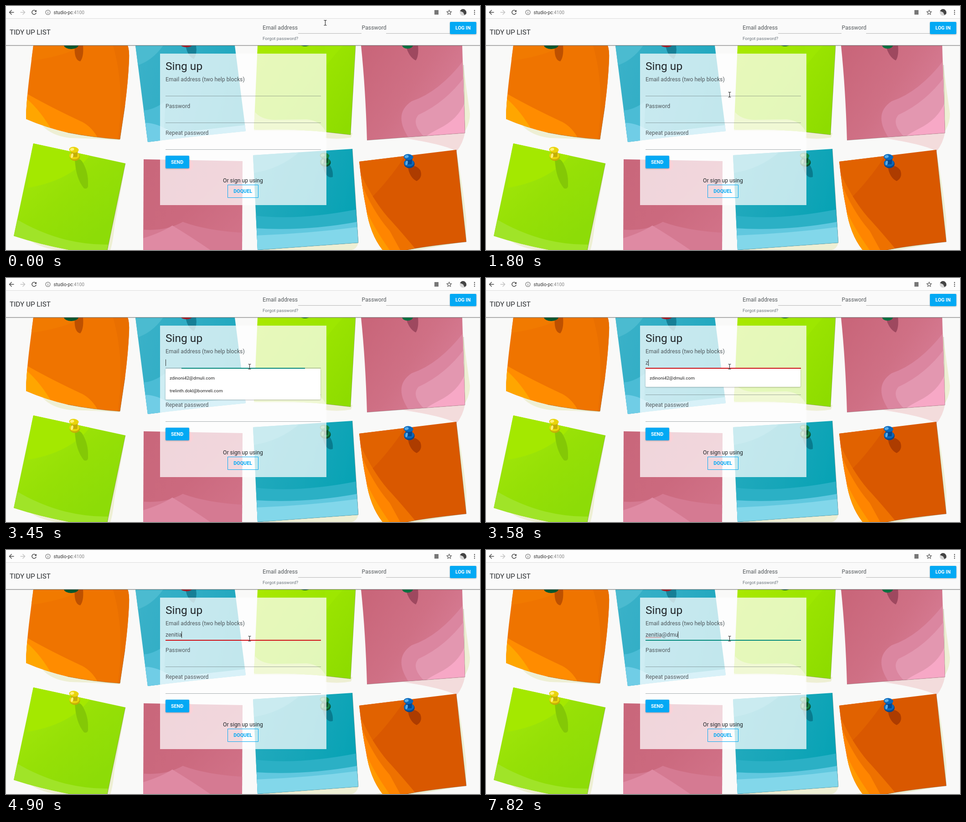
Recreate the animation shown at these times as an HTML page with a canvas. Size 1040 by 538 pixels, loop 8 s.

```html
<!DOCTYPE html>
<html lang="en">
<head>
<meta charset="utf-8">
<title>Sign-up form</title>
<style>
html, body { margin: 0; width: 100%; height: 100%; overflow: hidden; background: #f9f9f8; }
canvas { display: block; }
</style>
</head>
<body>
<canvas id="stage" width="1040" height="538"></canvas>
<script>
const W = 1040, H = 538, LOOP = 8000;
const FONT = 'Roboto, "Open Sans", sans-serif';
const view = document.getElementById('stage').getContext('2d');
const still = document.createElement('canvas');
still.width = W;
still.height = H;
let g = still.getContext('2d');

function shape(d, fill) {
  g.fillStyle = fill;
  g.fill(new Path2D(d));
}
function line(d, color, width = 1) {
  g.strokeStyle = color;
  g.lineWidth = width;
  g.stroke(new Path2D(d));
}
function rect(x, y, w, h, color) {
  g.fillStyle = color;
  g.fillRect(x, y, w, h);
}
function oval(x, y, rx, ry, color, turn = 0) {
  g.fillStyle = color;
  g.beginPath();
  g.ellipse(x, y, rx, ry, turn, 0, Math.PI * 2);
  g.fill();
}
function text(s, x, y, size, color, weight = 400) {
  g.font = `${weight} ${size}px ${FONT}`;
  g.fillStyle = color;
  g.fillText(s, x, y);
}
function fade(x0, y0, x1, y1, ...colors) {
  const f = g.createLinearGradient(x0, y0, x1, y1);
  colors.forEach((c, i) => f.addColorStop(i / (colors.length - 1), c));
  return f;
}
function raised(x, y, w, h, color) {
  g.save();
  g.shadowColor = 'rgba(0,0,0,.28)';
  g.shadowBlur = 3;
  g.shadowOffsetY = 1;
  g.fillStyle = color;
  g.beginPath();
  g.roundRect(x, y, w, h, 2);
  g.fill();
  g.restore();
}

// A paper outline with tinted areas clipped to it
function note(outline, fill, tints, edge) {
  shape(outline, fill);
  g.save();
  g.clip(new Path2D(outline));
  for (const [d, color] of tints) shape(d, color);
  g.restore();
  if (edge) line(edge, 'rgba(70,70,60,.3)');
}
function pin(x, y, dark, mid, light) {
  oval(x + 2, y + 7, 11.5, 9.5, dark);
  oval(x + 1, y + 5, 11, 8, mid);
  shape(`M${x - 7} ${y - 7}L${x - 5} ${y + 8}L${x + 7} ${y + 8}L${x + 9} ${y - 7}Z`, dark);
  oval(x, y - 8, 10.5, 6.5, mid, 0.1);
  oval(x - 4, y - 9, 4.5, 3, light, -0.2);
  oval(x - 4, y + 5, 2.5, 5, light, 0.2);
}

function notes() {
  const cream = '#eeefd4';

  shape('M80 264L252 290L249 296Q190 292 140 291Q100 286 80 264Z', cream);
  note('M60 87H267Q271 97 270 120Q268 165 261 220L250 294Q190 290 135 279Q85 267 44 249Q44 215 52 150Z', '#ef7400', [
    ['M48 87H165Q135 110 48 122Z', '#f17a00'],
    ['M235 87H280V294H245Q262 185 235 87Z', '#e96f00'],
    ['M40 190Q95 222 168 256Q190 268 203 294H40Z', '#ff8c00'],
    ['M40 200Q75 228 104 280L40 270Z', '#ffa600'],
    ['M150 87H169Q171 112 163 122Q153 120 151 104Z', '#bd5000']
  ], 'M261 220L250 294Q190 290 135 279');

  note('M284 87H502L526 276Q415 287 311 300Z', fade(290, 150, 520, 200, '#39b1c8', '#2eacc4', '#1da7bd'), [
    ['M280 87H345Q320 122 285 132Z', '#4bbbd0'],
    ['M296 230Q320 232 350 210L345 305H296Z', '#4bbcd5'],
    ['M300 258Q330 255 365 280L530 262V305H300Z', '#70cde6'],
    ['M394 87H417Q420 106 412 117Q398 110 394 87Z', '#167f96']
  ]);

  shape('M544 250L760 280L757 290Q730 295 700 291L703 276L544 275Z', cream);
  note('M552 87H767L756 284L703 278Q630 270 551 273L544 272Z', fade(545, 100, 765, 240, '#a9e800', '#9ce500', '#8edc00'), [
    ['M700 87H740Q716 112 700 135Z', '#9de700'],
    ['M540 225Q555 253 595 251L660 250Q690 252 703 280H540Z', '#c9e760']
  ], 'M767 88L756 284L703 278');

  shape('M1000 105L1010 180L1018 238Q1017 275 985 300L1003 278Z', cream);
  shape('M870 291L1007 279Q1003 302 989 320Q957 304 870 291Z', '#f3dcdc');
  note('M779 87H1001Q1004 190 1007 280L792 296Q789 185 779 87Z', fade(785, 115, 990, 250, '#c9667a', '#cf7085', '#d98099'), [
    ['M1004 120Q950 190 890 210Q845 240 890 300H1010Z', '#db86a0'],
    ['M1006 156Q965 212 905 240Q885 262 930 300H1010Z', '#e397b0'],
    ['M1007 212Q992 250 949 271Q929 281 913 293L1010 285Z', '#f7a8c6'],
    ['M877 87H904Q906 111 899 120Q884 113 877 87Z', '#9e485f']
  ], 'M1004 130L1007 280L792 296');

  shape('M259 365Q248 430 238 486Q235 520 229 538H205L222 430Z', cream);
  shape('M50 515L150 524V538H110Q72 532 50 515Z', cream);
  note('M60 303L262 347L222 540H150Q78 527 17 507Z', fade(60, 330, 205, 500, '#a2e70a', '#96e006', '#8ddc07'), [
    ['M58 300L185 328Q142 385 47 401Z', '#a4e800'],
    ['M23 470Q73 500 130 515Q180 527 224 526V540H10V500Z', '#a0e428'],
    ['M151 338Q163 334 169 346Q181 367 180 394Q181 405 171 402Q153 380 151 338Z', '#84c806']
  ], 'M262 347L222 540');
  pin(149, 325, '#c4ae07', '#e9d40b', '#fff27a');

  note('M302 338L519 342L518 538H301Z', fade(310, 350, 490, 538, '#c9677b', '#cb697e', '#d27389'), [
    ['M301 493Q350 497 388 476Q439 495 519 500V540H301Z', '#d57a92'],
    ['M301 512Q340 500 365 484Q411 512 451 540H301Z', '#df8aa3']
  ]);
  oval(399, 351, 11, 13, '#ee5a72');

  shape('M552 538L773 522Q770 535 759 538Z', cream);
  note('M542 329L760 315Q766 415 773 522L552 538Z', fade(555, 350, 760, 430, '#23aabe', '#17a6b9', '#08a3b5'), [
    ['M540 325L646 320Q602 359 544 368Z', '#3bb6c8'],
    ['M545 462Q640 474 772 448V540H545Z', '#2bb0c5'],
    ['M547 490Q659 497 775 475V540H547Z', '#61c8df'],
    ['M549 506Q661 502 775 487V540H549Z', '#82d7ea'],
    ['M698 338Q719 353 717 377Q703 382 695 355Z', '#087b8e']
  ], 'M760 315Q766 415 773 522L552 538');
  pin(699, 338, '#07502c', '#138343', '#66b47d');

  shape('M990 330Q1003 403 1010 470L1010 519L905 538H811Q880 525 975 510Z', cream);
  note('M775 343L988 317L1010 520Q915 530 870 540H828Q799 505 790 445Q781 400 775 343Z', '#d95800', [
    ['M770 338L878 327Q835 392 792 432Z', '#e16200'],
    ['M776 365Q805 428 838 466Q863 493 902 540H814L780 450Z', '#ee7100'],
    ['M778 386Q803 451 842 496L866 540H810Z', '#ff8500'],
    ['M785 439Q806 488 843 540H804Z', '#ff9a00'],
    ['M882 356Q898 347 909 362Q915 378 901 386Q886 379 882 356Z', '#ad3c00']
  ], 'M988 317L1010 520Q915 530 870 540');
  pin(883, 341, '#07478d', '#0869bd', '#5baee8');

  // Pins half covered by the header
  for (const [x, rx, ry, c] of [[143, 16, 9, '#0b572e'], [396, 12, 5, '#a91a26'], [656, 9, 3, '#0c6831'], [881, 12, 8, '#0b7041']]) {
    oval(x, 86, rx, ry, c);
  }
}

function browserBar() {
  rect(0, 0, W, 28, '#fdfdfd');
  rect(0, 27, W, 1, '#dcdcdc');
  line('M17.5 14H8M12.5 9L7.5 14L12.5 19', '#4b4b4b', 1.5);
  line('M31.5 14H41M36.5 9L41.5 14L36.5 19', '#c4c4c4', 1.5);
  line('M65.3 11A4.7 4.7 0 1 0 66.2 15', '#4b4b4b', 1.5);
  shape('M67 8.5V13H62.5Z', '#4b4b4b');
  line('M97 14A5 5 0 1 0 87 14A5 5 0 1 0 97 14M92 13V17M92 10.7V12', '#666', 1.1);
  const host = 'studio-pc';
  text(host, 104.5, 17.5, 10.2, '#333');
  text(':4100', 104.5 + g.measureText(host).width, 17.5, 10.2, '#858585');
  rect(940, 9, 9, 10, '#777');
  g.beginPath();
  for (let i = 0; i < 10; i++) {
    const a = i * Math.PI / 5 - Math.PI / 2, r = i % 2 ? 2.4 : 5.4;
    g.lineTo(972.3 + r * Math.cos(a), 14.3 + r * Math.sin(a));
  }
  g.closePath();
  g.strokeStyle = '#555';
  g.lineWidth = 1.1;
  g.stroke();
  oval(1003, 14, 7.5, 7.5, '#d6d6d6');
  shape('M996 11Q1000 5 1006 7.5Q1011 11 1010 17L1006 20L1003 14Z', '#444');
  for (const y of [10, 14, 18]) oval(1028, y, 1.2, 1.2, '#555');
}

function header() {
  rect(0, 28, W, 58, '#fafafa');
  rect(0, 86, W, 1, '#b4b4b4');
  rect(0, 87, W, 1, 'rgba(90,90,90,.5)');
  text('TIDY UP LIST', 8, 62.5, 15.3, '#26292c');
  text('Email address', 563, 52, 12.25, '#555a5d');
  text('Password', 780.5, 52, 12.25, '#555a5d');
  text('Forgot password?', 563, 75, 9.8, '#6c757d');
  rect(641, 60, 139, 1, '#b5b5b5');
  rect(834, 60, 140, 1, '#b5b5b5');
  raised(974, 35, 58, 27, '#03a9f4');
  text('LOG IN', 986, 52.3, 10.72, '#fff', 700);
}

function form() {
  rect(338, 105, 365, 334, 'rgba(255,255,255,.73)');
  text('Sing up', 350, 140.5, 24.5, '#212529');
  const rows = ['Email address (two help blocks)', 'Password', 'Repeat password'];
  rows.forEach((s, i) => {
    text(s, 350, Math.round(165.5 + i * 59.2), 12.25, '#50595d');
    rect(350, 198 + i * 59, 341, 1, 'rgba(85,95,98,.5)');
  });
  raised(350, 330, 52, 28, '#03a9f4');
  text('SEND', 362, 348, 10.72, '#fff', 700);
  text('Or sign up using', 476, 388.5, 12.25, '#212529');
  line('M486.5 394.5H553.5V422.5H486.5Z', '#03a9f4');
  text('DOQUEL', 499.3, 412, 10.72, '#03a9f4', 700);
}

function build() {
  rect(0, 0, W, H, '#f9f9f8');
  notes();
  form();
  header();
  browserBar();
}

// Latest entry whose start time has passed
const at = (list, t) => list.reduce((last, e) => e[0] <= t ? e : last);

const pointer = [[0, 700.5, 37], [1190, 595, 151], [1350, 568, 157], [1500, 542, 188], [1650, 537, 196], [1800, 534.5, 195.5]];
const RED = '#d00b12', TEAL = '#00897b';
const user = 'zenitia';
// Start, typed text, caret shown, underline colour, suggestions open
const typing = [
  [0, '', false, '', 0],
  [3310, '', true, '', 0],
  [3450, '', true, TEAL, 2],
  [3580, 'z', true, RED, 1],
  [3710, 'ze', true, RED, 0],
  [4250, 'ze', false, RED, 0],
  [4500, 'zeni', true, RED, 0],
  [4620, 'zenit', true, RED, 0],
  [4900, user, true, RED, 0],
  [5470, user, false, RED, 0],
  [5740, user + '"', true, RED, 0],
  [6300, user + '"', false, RED, 0],
  [6430, user, true, RED, 0],
  [6860, user + '@', true, RED, 0],
  [7400, user + '@', false, RED, 0],
  [7550, user + '@d', true, TEAL, 0],
  [7820, user + '@dmu', true, TEAL, 0]
];
const mails = ['zdinoni42@dmuli.com', 'trelinth.dokl@bomreli.com'];

function field(t) {
  const [, typed, caret, color, open] = at(typing, t);
  if (color) {
    const half = open === 2 ? 135.5 : 170.5;
    rect(520.5 - half, 198, half * 2, 2, color);
  }
  text(typed, 350, 191, 12.25, '#495057');
  if (caret) rect(350 + Math.floor(g.measureText(typed).width), 179.5, 1, 14.5, '#333');
  if (typed.includes('@')) {
    let d = 'M350 193.5';
    for (let x = 351.5, i = 0; x < 386; x += 1.5, i++) d += `L${x} ${i % 2 ? 193.5 : 192}`;
    line(d, 'rgba(235,45,45,.85)', 0.8);
  }
  if (open) {
    raised(350, 200, 340, 12 + open * 28, '#fff');
    mails.slice(0, open).forEach((s, i) => text(s, 359, 224 + i * 27.7, 9.95, '#222'));
  }
}

function beam(t) {
  const [, x, y] = at(pointer, t);
  const d = `M${x - 3} ${y - 5.5}H${x - 1}L${x} ${y - 4.5}L${x + 1} ${y - 5.5}H${x + 3}` +
    `M${x} ${y - 4.5}V${y + 4.5}M${x - 3} ${y + 5.5}H${x - 1}L${x} ${y + 4.5}L${x + 1} ${y + 5.5}H${x + 3}`;
  line(d, 'rgba(255,255,255,.6)', 2);
  line(d, '#222', 1.1);
}

build();
g = view;
const start = performance.now();
function draw() {
  const t = (performance.now() - start) % LOOP;
  g.drawImage(still, 0, 0);
  field(t);
  beam(t);
  requestAnimationFrame(draw);
}
draw();
</script>
</body>
</html>
```
